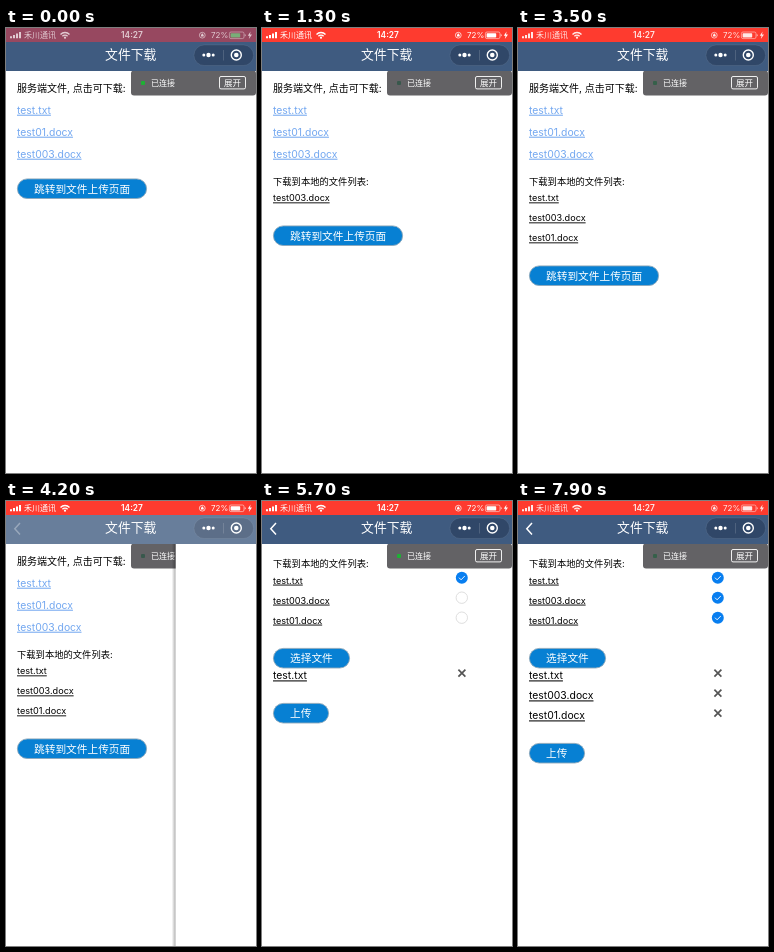
Write an HTML page that moves like this. It is 250 by 445 pixels and loops after 8000 ms.

```html
<!DOCTYPE html>
<html lang="zh">
<head>
<meta charset="utf-8">
<title>文件下载</title>
<style>
html, body { margin: 0; width: 100%; height: 100%; overflow: hidden; background: #fff; }
svg { display: block; width: 100vw; height: 100vh; }
text { font-family: Inter, 'Noto Sans CJK SC', 'Noto Sans CJK', sans-serif; white-space: pre; }
.u { text-decoration: underline; }
</style>
</head>
<body>
<svg viewBox="0 0 250 445" xmlns="http://www.w3.org/2000/svg">
  <defs>
    <linearGradient id="shade">
      <stop offset="0" stop-color="#000" stop-opacity="0"/>
      <stop offset="1" stop-color="#000" stop-opacity=".32"/>
    </linearGradient>
    <g id="panel">
      <rect x="125" y="42.5" width="125" height="25" rx="3" fill="#636265"/>
      <rect id="led" x="135" y="53" width="4" height="4" rx="1"/>
      <text x="145" y="58" font-size="8" fill="#fff">已连接</text>
      <rect x="213.5" y="48.5" width="26" height="12.4" rx="1.5" fill="none" stroke="#fff" stroke-width=".9"/>
      <text x="218" y="57.7" font-size="8.5" fill="#fff">展开</text>
    </g>
  </defs>
  <rect width="250" height="445" fill="#fff"/>
  <g id="first"></g>
  <g id="second">
    <rect id="edge" x="-4" y="43" width="4" height="402" fill="url(#shade)"/>
    <rect y="43" width="250" height="402" fill="#fff"/>
    <g id="body"></g>
  </g>

  <rect y="14" width="250" height="29" fill="#3f5b80"/>
  <rect x="188" y="17" width="59.5" height="20.5" rx="10.2" fill="#1b2c46" fill-opacity=".42" stroke="#fff" stroke-opacity=".13" stroke-width=".6"/>
  <rect id="veil" y="14" width="250" height="29" fill="#fff"/>
  <path id="back" d="M14 22L8.8 27.7L14 33.4" fill="none" stroke="#fff" stroke-width="1.5"/>
  <text x="124.7" y="31.4" font-size="12.8" font-weight="500" fill="#fff" text-anchor="middle">文件下载</text>
  <path d="M217.5 22V32.5" stroke="#fff" stroke-opacity=".25" stroke-width=".6"/>
  <g fill="#fff">
    <circle cx="197.8" cy="27" r="1.5"/><circle cx="202.5" cy="27" r="2.2"/><circle cx="207.2" cy="27" r="1.5"/>
    <circle cx="230.3" cy="27" r="2.3"/>
    <circle cx="230.3" cy="27" r="5" fill="none" stroke="#fff" stroke-width="1.4"/>
  </g>

  <rect id="bar" width="250" height="14"/>
  <g id="status" fill="#fff">
    <path d="M4 10.2V8.2H6V10.2ZM7 10.2V7H9V10.2ZM10 10.2V5.6H12V10.2ZM13 10.2V4H15V10.2Z"/>
    <text x="18" y="10.1" font-size="8">禾川通讯</text>
    <path d="M54.5 6.4a6.4 6.4 0 0 1 9 0M56.4 8.2a3.7 3.7 0 0 1 5.2 0" fill="none" stroke="#fff" stroke-width="1.4"/>
    <circle cx="59" cy="9.7" r="1.1"/>
    <text x="126" y="10.2" font-size="8.4" font-weight="600" text-anchor="middle">14:27</text>
    <circle cx="196.3" cy="7.2" r="2.9" fill="none" stroke="#fff" stroke-width=".7"/>
    <path d="M195 6.8H197.7V8.6H195ZM195.4 6.8a.9 1.2 0 0 1 1.8 0Z"/>
    <text x="205" y="10.1" font-size="8">72%</text>
    <rect x="223.4" y="4" width="14.6" height="6.6" rx="1.6" fill="none" stroke="#fff" stroke-width=".7" stroke-opacity=".75"/>
    <rect id="charge" x="224.6" y="5.2" width="9.6" height="4.2" rx=".7"/>
    <path d="M238.8 6.1a1.3 1.3 0 0 1 0 2.4Z"/>
    <path d="M244.6 3.6L241.8 7.7H243.6L242.8 11L246 6.6H244Z"/>
  </g>
</svg>
<script>
const LOOP = 8000;
const FILES = ['test.txt', 'test003.docx', 'test01.docx'];
const SAVED = [[850, [1]], [2000, [1, 2]], [3000, [0, 1, 2]]];
const PICKED = [5500, 6250, 6750];
const SLIDE = { start: 4113, length: 500, filled: 4350 };

const $ = id => document.getElementById(id);
const clamp = x => Math.max(0, Math.min(1, x));
const mix = (a, b, k) => `rgb(${a.map((v, i) => Math.round(v + (b[i] - v) * k))})`;

const label = (x, y, size, str, fill = '#000', cls = '') =>
  `<text x="${x}" y="${y}" font-size="${size}" fill="${fill}" class="${cls}">${str}</text>`;
const link = (y, size, str, fill) => label(11, y, size, str, fill, 'u');
const button = (y, w, str) =>
  `<rect x="11.4" y="${y + .4}" width="${w - .8}" height="19.6" rx="9.8" fill="#0780d3" stroke="#8fa9ba" stroke-width=".9"/>` +
  label(28, y + 14, 10.7, str, '#fff');
const localList = (y, ids) => label(11, y, 9.3, '下载到本地的文件列表:') +
  ids.map((id, i) => link(y + 16.6 + 20 * i, 9.15, FILES[id])).join('');

const tick = (y, on) => on
  ? `<circle cx="199.8" cy="${y - .3}" r="6" fill="#087ef0"/>
     <path d="M197 ${y - .3}l2.1 2.1l3.7-3.8" fill="none" stroke="#fff" stroke-width=".9"/>`
  : `<circle cx="199.8" cy="${y - .3}" r="5.7" fill="#fff" stroke="#d6d6d6" stroke-width=".8"/>`;
const cross = y => `<path d="M196.4 ${y - 3.5}l7 7m0-7l-7 7" stroke="#555" stroke-width="1.7"/>`;

function firstPage(ids) {
  const links = [0, 2, 1].map((id, i) => link(85.7 + 22 * i, 10.4, FILES[id], '#74a8f0'));
  return label(11, 63.8, 10, '服务端文件, 点击可下载:') + links.join('') +
    (ids.length ? localList(156.8, ids) : '') +
    button(ids.length ? 177.5 + 20 * ids.length : 150.5, 130, '跳转到文件上传页面') +
    '<use href="#panel"/>';
}

function secondPage(count) {
  const ticks = FILES.map((_, i) => tick(77 + 20 * i, i < count));
  const chosen = FILES.slice(0, count).map((name, i) =>
    link(178.4 + 20 * i, 10.4, name) + cross(172.2 + 20 * i));
  return localList(66, [0, 1, 2]) + ticks.join('') +
    button(147, 77, '选择文件') + chosen.join('') +
    button(182 + 20 * count, 56, '上传') + '<use href="#panel"/>';
}

// Rebuild a group only when its content differs
const shown = {};
function fill(id, key, make) {
  if (shown[id] === key) return;
  shown[id] = key;
  $(id).innerHTML = make();
}

function draw(t) {
  const saved = SAVED.filter(([at]) => t >= at).map(([, ids]) => ids).pop() || [];
  const count = PICKED.filter(at => t >= at).length;
  fill('first', saved.length, () => firstPage(saved));
  fill('body', t < SLIDE.filled ? -1 : count, () => t < SLIDE.filled ? '' : secondPage(count));

  const u = clamp((t - SLIDE.start) / SLIDE.length);
  const p = 1 - (1 - u) ** 2;
  const x = 250 * (1 - p);
  const moving = p > 0 && p < 1;
  $('second').setAttribute('transform', `translate(${x})`);
  $('second').style.display = p > 0 ? '' : 'none';
  $('edge').style.display = moving ? '' : 'none';
  $('veil').setAttribute('opacity', .25 * Math.sin(Math.PI * p));
  $('back').setAttribute('opacity', p);

  const red = clamp(t / 500);
  const pulse = .94 + .06 * Math.cos(2 * Math.PI * (t - 1300) / 1433);
  $('bar').setAttribute('fill', mix([151, 72, 96], [254, 59, 47], red));
  $('status').setAttribute('opacity', (.72 + .28 * red) * pulse);
  $('charge').setAttribute('fill', mix([110, 215, 130], [255, 255, 255], red));

  const glow = Math.max(0, Math.cos(2 * Math.PI * t / 1900)) ** 4;
  $('led').setAttribute('fill', mix([56, 88, 76], [30, 176, 52], glow));
}

const begin = performance.now();
function frame() {
  draw((performance.now() - begin) % LOOP);
  requestAnimationFrame(frame);
}
frame();
</script>
</body>
</html>
```
